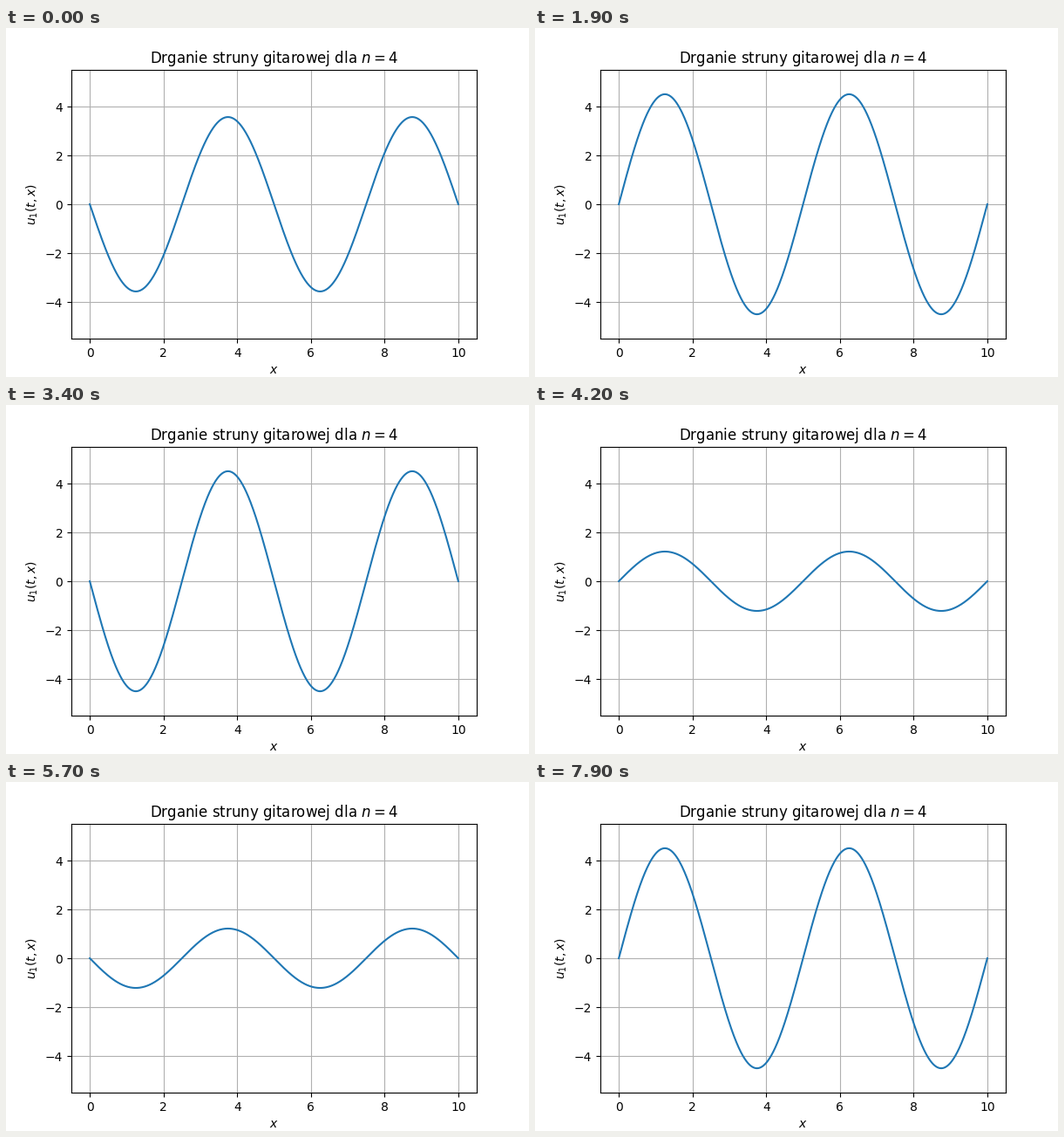
Write a matplotlib script that moves like this. It is 600 by 400 pixels and loops after 8 s.

```python
import numpy as np
import matplotlib.pyplot as plt
from matplotlib.animation import FuncAnimation

FRAMES = 80
INTERVAL = 100              # ms
LENGTH = 10                 # string length
MODE = 4
AMPLITUDE = 4.565
STEP = 2 * np.pi / 30       # phase advance per frame
PHASE = np.arctan(0.5) + STEP

x = np.linspace(0, LENGTH, 1000)
shape = np.sin(MODE * np.pi * x / LENGTH)

fig, ax = plt.subplots(figsize=(6, 4), dpi=100)
ax.set_xlim(-0.5, 10.5)
ax.set_ylim(-5.5, 5.5)
ax.set_title(f"Drganie struny gitarowej dla $n={MODE}$")
ax.set_xlabel("$x$")
ax.set_ylabel("$u_1(t,x)$")
ax.grid(True)
line, = ax.plot(x, np.zeros_like(x))


def update(i):
    line.set_ydata(-AMPLITUDE * np.cos(STEP * i - PHASE) * shape)
    return line,


anim = FuncAnimation(fig, update, frames=FRAMES, interval=INTERVAL,
                     repeat=True, repeat_delay=0)
plt.show()
```
